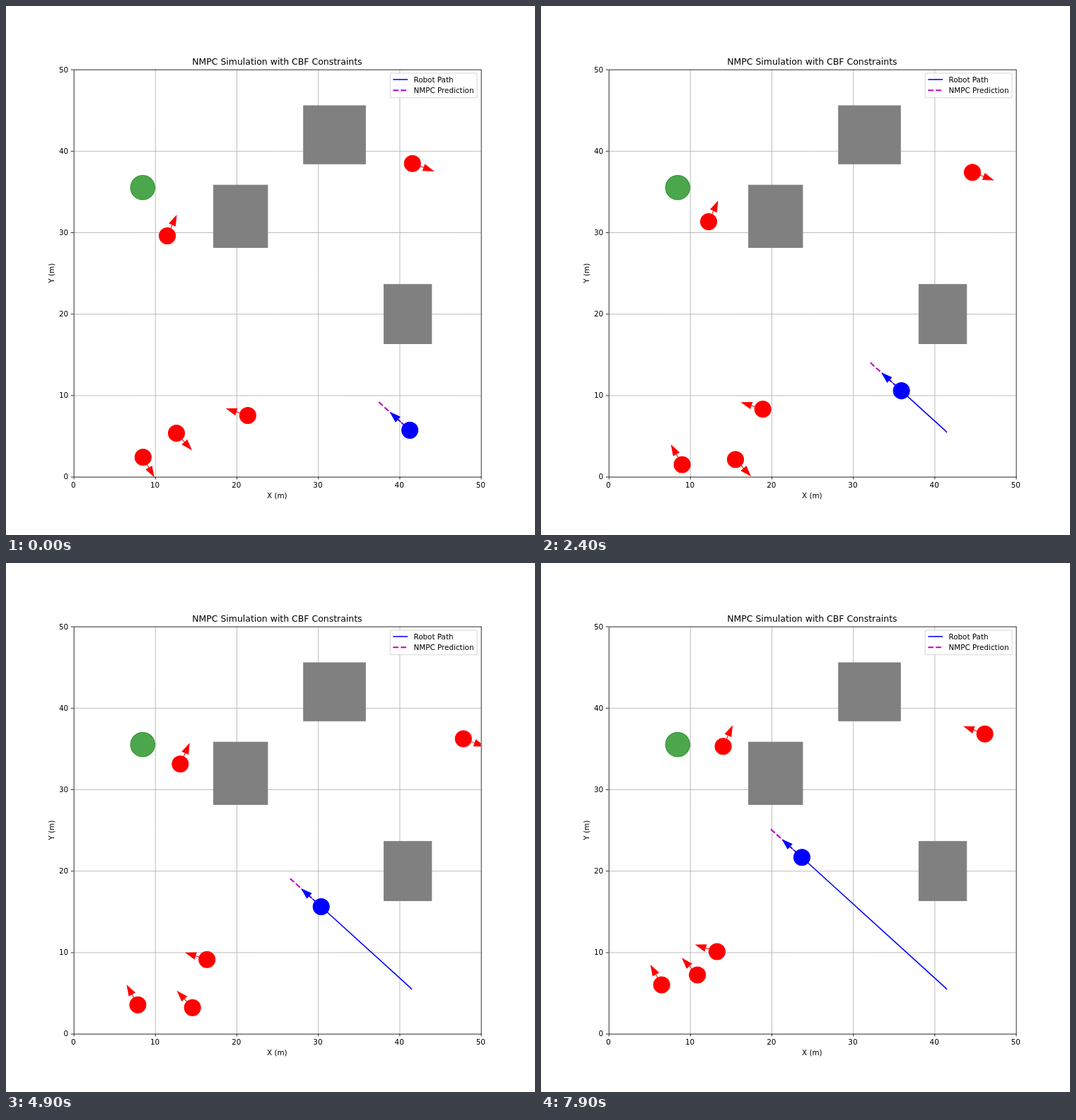
Write an HTML page with a canvas that moves like this. It is 748 by 748 pixels and loops after 8000 ms.

```html
<!DOCTYPE html>
<html lang="en">
<head>
<meta charset="utf-8">
<title>NMPC Simulation</title>
<style>
  html, body { margin: 0; width: 100%; height: 100%; overflow: hidden; background: #fff; }
  canvas { display: block; width: 748px; height: 748px; }
</style>
</head>
<body>
<canvas id="stage" width="748" height="748"></canvas>
<script>
const ctx = document.getElementById('stage').getContext('2d');
const STEP = 100, STEPS = 80;

// The figure is laid out on 1000 x 1000 units at 100 units per inch
ctx.scale(0.748, 0.748);
const PT = 100 / 72;
const L = 127.5, R = 897.5, T = 120, B = 890;
const UNIT = (R - L) / 50;
const RED = '#f00', BLUE = '#00f', MAGENTA = '#bf00bf';
const DASH = [7.4 * PT, 3.2 * PT];

const px = x => L + x * UNIT;
const py = y => B - y * UNIT;
const snap = v => Math.floor(v + 0.5) + 0.5;   // straight lines sit on half units

const start = [41.5, 5.5], goal = [8.5, 35.5], stride = 0.3;

// Start and velocity in metres per step; turn = last step before reversing
const movers = [
  { x: 11.523, y: 29.58, vx: 0.0324, vy: 0.0722, turn: Infinity },
  { x: 41.612, y: 38.46, vx: 0.1276, vy: -0.0458, turn: 57 },
  { x: 21.4, y: 7.528, vx: -0.1022, vy: 0.0324, turn: Infinity },
  { x: 12.642, y: 5.349, vx: 0.123, vy: -0.1341, turn: 32 },
  { x: 8.545, y: 2.402, vx: 0.0458, vy: -0.082, turn: 17 }
];

// Left, top, right, bottom
const blocks = [
  [562.5, 188.5, 679.5, 298.5],
  [392.5, 338.5, 494.5, 456.5],
  [714.5, 526.5, 804.5, 638.5]
];

function line(points, color, width, dash = []) {
  ctx.strokeStyle = color;
  ctx.lineWidth = width * PT;
  ctx.setLineDash(dash);
  ctx.beginPath();
  for (const p of points) ctx.lineTo(...p);
  ctx.stroke();
  ctx.setLineDash([]);
}

function paint(color) {
  ctx.fillStyle = ctx.strokeStyle = color;
  ctx.lineWidth = PT;
  ctx.fill();
  ctx.stroke();
}

function disc(x, y, r, color) {
  ctx.beginPath();
  ctx.arc(px(x), py(y), r * UNIT, 0, Math.PI * 2);
  paint(color);
}

function arrow(x, y, angle, shaft, color) {
  const base = shaft * UNIT, tip = base + 1.2 * UNIT, half = 0.4 * UNIT;
  ctx.save();
  ctx.translate(px(x), py(y));
  ctx.rotate(-angle);
  line([[0, 0], [base, 0]], color, 1);
  ctx.beginPath();
  ctx.moveTo(tip, 0);
  ctx.lineTo(base, half);
  ctx.lineTo(base, -half);
  ctx.closePath();
  paint(color);
  ctx.restore();
}

function text(str, x, y, align = 'center', size = 10) {
  ctx.font = `${size * PT}px "DejaVu Sans", sans-serif`;
  ctx.textAlign = align;
  ctx.fillStyle = '#000';
  ctx.fillText(str, x, y);
}

function drawGrid() {
  for (let v = 10; v < 50; v += 10) {
    const x = snap(px(v)), y = snap(py(v));
    line([[x, T], [x, B]], '#b0b0b0', 0.8);
    line([[L, y], [R, y]], '#b0b0b0', 0.8);
  }
}

function drawAxes() {
  ctx.strokeStyle = '#000';
  ctx.lineWidth = 0.8 * PT;
  ctx.strokeRect(snap(L), snap(T), R - L, B - T);
  const tick = 3.5 * PT;
  for (let v = 0; v <= 50; v += 10) {
    const x = snap(px(v)), y = snap(py(v));
    line([[x, B], [x, B + tick]], '#000', 0.8);
    line([[L, y], [L - tick, y]], '#000', 0.8);
    text(v, px(v), 911);
    text(v, L - 2 * tick, py(v) + 5, 'right');
  }
  const mid = (L + R) / 2;
  text('NMPC Simulation with CBF Constraints', mid, 111.4, 'center', 12);
  text('X (m)', mid, 931);
  ctx.save();
  ctx.translate(91, (T + B) / 2);
  ctx.rotate(-Math.PI / 2);
  text('Y (m)', 0, 0);
  ctx.restore();
}

function drawLegend() {
  ctx.beginPath();
  ctx.roundRect(726.2, 127, 164.3, 46.5, 2.8);
  ctx.fillStyle = 'rgba(255,255,255,0.8)';
  ctx.fill();
  ctx.strokeStyle = 'rgba(204,204,204,0.8)';
  ctx.lineWidth = PT;
  ctx.stroke();
  line([[731.7, 139], [759.5, 139]], BLUE, 1.5);
  line([[731.7, 159.5], [759.5, 159.5]], MAGENTA, 2, DASH);
  text('Robot Path', 770.6, 144, 'left');
  text('NMPC Prediction', 770.6, 164, 'left');
}

function drawRobot(n) {
  const heading = (a, b) => Math.atan2(b[1] - a[1], b[0] - a[0]);
  const move = (p, angle, d) => [p[0] + Math.cos(angle) * d, p[1] + Math.sin(angle) * d];
  const screen = p => [px(p[0]), py(p[1])];

  // The first step is a little steeper than the straight way to the goal
  const first = move(start, heading(start, goal) - 0.07, stride);
  const dir = heading(first, goal);
  const pos = move(first, dir, n * stride);

  ctx.lineCap = 'square';
  line([start, first, pos].map(screen), BLUE, 1.5);
  ctx.lineCap = 'butt';
  line([move(pos, dir, -stride), move(pos, dir, 18 * stride)].map(screen), MAGENTA, 2, DASH);
  disc(...pos, 1, BLUE);
  arrow(...pos, dir, 2, BLUE);
}

function drawMover(m, n) {
  const back = n > m.turn;
  const k = back ? 2 * m.turn + 1 - n : n;   // one step is spent turning
  const x = m.x + m.vx * k, y = m.y + m.vy * k;
  disc(x, y, 1, RED);
  arrow(x, y, Math.atan2(m.vy, m.vx) + (back ? Math.PI : 0), 1.5, RED);
}

function draw(n) {
  ctx.fillStyle = '#fff';
  ctx.fillRect(0, 0, 1000, 1000);
  drawGrid();

  ctx.save();
  ctx.beginPath();
  ctx.rect(L, T, R - L, B - T);
  ctx.clip();
  for (const [x1, y1, x2, y2] of blocks) {
    ctx.beginPath();
    ctx.rect(x1, y1, x2 - x1, y2 - y1);
    paint('#808080');
  }
  disc(...goal, 1.5, 'rgba(0,128,0,0.7)');
  drawRobot(n);
  for (const m of movers) drawMover(m, n);
  ctx.restore();

  drawAxes();
  drawLegend();
}

const begin = performance.now();
function loop() {
  const t = Math.max(0, performance.now() - begin);
  draw(Math.floor(t / STEP) % STEPS);
  requestAnimationFrame(loop);
}
loop();
</script>
</body>
</html>
```
